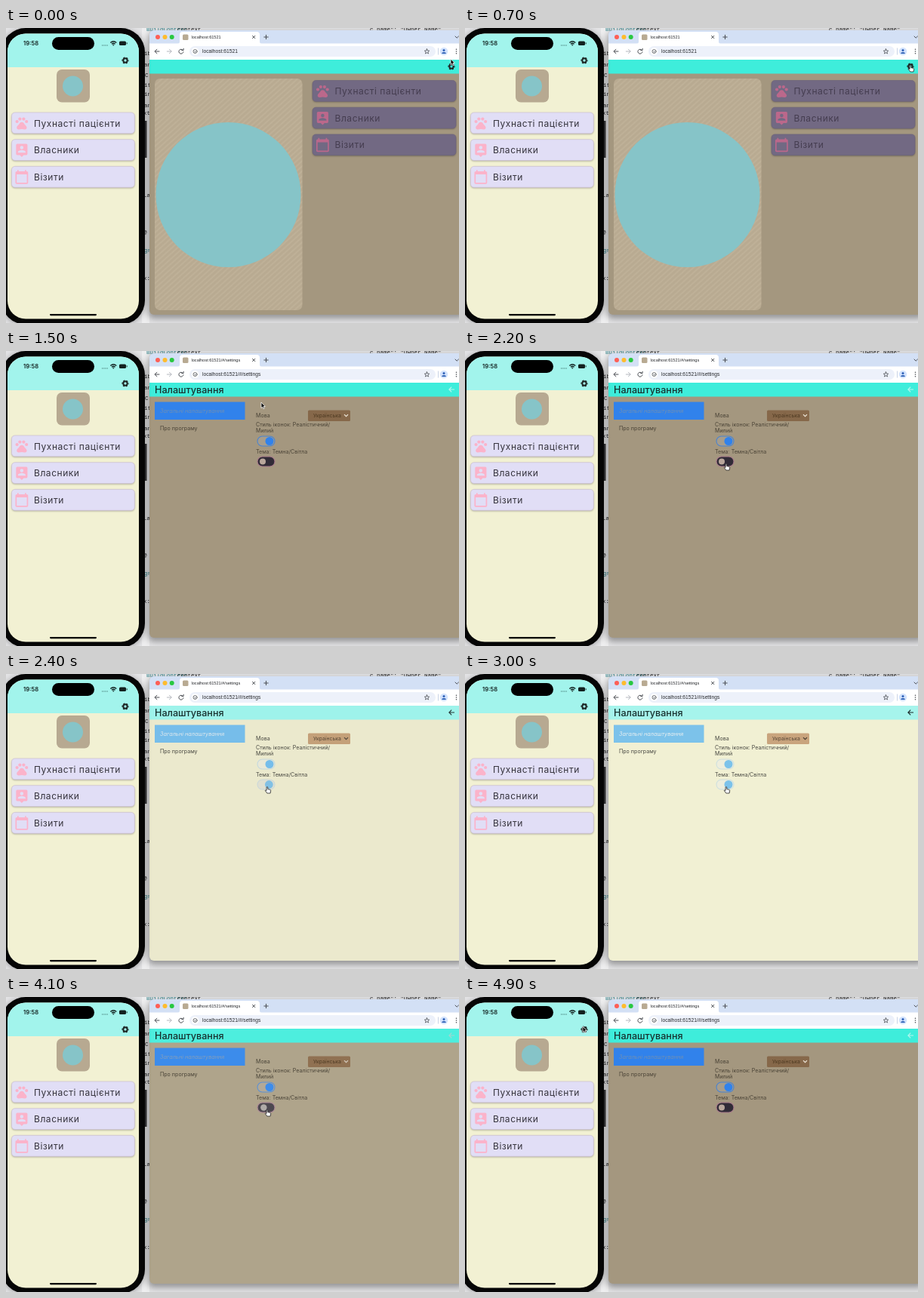
Write an HTML page that moves like this. It is 600 px wide and 391 px high and loops after 5 s.

```html
<!DOCTYPE html>
<html lang="uk">
<head>
<meta charset="utf-8">
<style>
html, body { margin: 0; width: 100%; height: 100%; overflow: hidden; background: #e3e3e5; }
svg { display: block; width: 600px; height: 391px; --k: 0%; }
text { font-family: Inter, "Noto Sans", sans-serif; white-space: pre; }
.code { font: 7.5px "Liberation Mono", monospace; fill: #222; }
.ui { font-family: "Liberation Sans", Arial, sans-serif; fill: #26282c; }
.line { fill: none; stroke: #4a4d52; stroke-width: 1; stroke-linecap: round; stroke-linejoin: round; }
.row { font-size: 12px; letter-spacing: .55px; }
.small { font-size: 7.1px; fill: color-mix(in srgb, #484842 var(--k), #4a4336); }
/* --k runs from the dark theme (0%) to the light one (100%) */
.bg { fill: color-mix(in srgb, #f1f0d3 var(--k), #a4977f); }
.bar { fill: color-mix(in srgb, #a6f4ec var(--k), #3eeddb); }
.accent { fill: color-mix(in srgb, #7cc2ea var(--k), #3182eb); }
.accentText { font-size: 7.3px; font-style: italic; fill: color-mix(in srgb, #e6eef0 var(--k), #6f8fb4); }
.menu { fill: color-mix(in srgb, #c9a47d var(--k), #86684a); }
.menuText { font-size: 6.8px; fill: color-mix(in srgb, #544536 var(--k), #4c3820); }
.chevron { fill: none; stroke-width: 1.2; stroke: color-mix(in srgb, #453a30 var(--k), #f0e8dc); }
.back { fill: none; stroke-width: 1.2; stroke: color-mix(in srgb, #1d2b2a var(--k), #b4f6ee); }
.track { stroke-width: 1.1; }
.on { fill: color-mix(in srgb, #eeeedd var(--k), #a79d8c); stroke: color-mix(in srgb, #cfe0df var(--k), #4a83d0); }
.theme { fill: color-mix(in srgb, #eeeedd var(--k), #312b37); stroke: color-mix(in srgb, #cfe0df var(--k), #a87a8a); }
.themeThumb { fill: color-mix(in srgb, #7cc2ea var(--k), #b9a79c); }
</style>
</head>
<body>
<svg id="stage" viewBox="0 0 600 391">
  <defs>
    <filter id="soft" x="-20%" y="-20%" width="140%" height="140%"><feGaussianBlur stdDeviation=".8"/></filter>
    <filter id="wide" x="-10%" y="-10%" width="120%" height="120%"><feGaussianBlur stdDeviation="4"/></filter>
    <pattern id="hatch" width="5" height="5" patternUnits="userSpaceOnUse" patternTransform="rotate(48)">
      <path d="M1 0V5" stroke="#95866d" stroke-width="1" opacity=".16"/>
      <path d="M3.500 0V5" stroke="#d8cbb2" stroke-width="1" opacity=".16"/>
    </pattern>
    <g id="paw">
      <circle cx="4.5" cy="9.5" r="2.5"/><circle cx="9" cy="5.5" r="2.5"/>
      <circle cx="15" cy="5.5" r="2.5"/><circle cx="19.5" cy="9.5" r="2.5"/>
      <path d="M12 10.5c-3 0-3.600 2.400-5.300 4.400c-1.300 1.300-2.900 2.800-2.600 4.800c.6 2 1.800 2.500 3.400 2.300q4.500-.9 9 0c1.600.2 2.800-.3 3.400-2.300c.3-2-1.300-3.500-2.600-4.800c-1.700-2-2.300-4.400-5.300-4.400z"/>
    </g>
    <path id="owner" fill-rule="evenodd" d="M19 2H5a2 2 0 0 0-2 2v14a2 2 0 0 0 2 2h4l3 3 3-3h4a2 2 0 0 0 2-2V4a2 2 0 0 0-2-2zM12 5.300a2.700 2.700 0 1 1 0 5.400a2.700 2.700 0 0 1 0-5.400zM18 16H6v-.9c0-2 4-3.100 6-3.100s6 1.100 6 3.100z"/>
    <path id="visit" fill-rule="evenodd" d="M20 3h-1V1h-2v2H7V1H5v2H4a2 2 0 0 0-2 2v16a2 2 0 0 0 2 2h16a2 2 0 0 0 2-2V5a2 2 0 0 0-2-2zM20 21H4V8h16z"/>
    <g id="gear" fill="none" stroke="#1c2423">
      <circle r="2.700" stroke-width="2"/>
      <circle r="4" stroke-width="1.200" stroke-dasharray="2.200 1.989" stroke-dashoffset="1.100"/>
    </g>
    <clipPath id="page"><path d="M190 42H600V380H196a6 6 0 0 1-6-6z"/></clipPath>
    <clipPath id="screen"><rect x="2" y="7.500" width="174" height="378" rx="24"/></clipPath>
  </defs>

  <rect width="600" height="391" fill="#e3e3e5"/>
  <g id="editor"></g>

  <rect x="188" y="6" width="420" height="379" rx="7" opacity=".35" filter="url(#wide)"/>
  <path d="M190 380V9a6 6 0 0 1 6-6H600V42H190z" fill="#d3e0f5"/>
  <g fill="#fe5f57"><circle cx="201" cy="12" r="3"/><circle cx="210.500" cy="12" r="3" fill="#febc2e"/><circle cx="219.700" cy="12" r="3" fill="#28c840"/></g>
  <path d="M227 21q3 0 3-3V9q0-4 4-4h98q4 0 4 4v9q0 3 3 3z" fill="#fff"/>
  <rect x="190" y="20.500" width="410" height="21.500" fill="#fff"/>
  <rect x="234" y="8.500" width="7.500" height="7.500" rx="1.500" fill="#b8aa92"/>
  <text id="tabUrl" class="ui" x="245.500" y="14.200" font-size="5.600"></text>
  <path class="line" d="M326.500 10.300l3.400 3.400m0-3.400l-3.400 3.400M341.800 12h5.400m-2.700-2.700v5.400M595 11l2.200 2.200 2.200-2.200"/>
  <path class="line" d="M203 31h-5.800m2.700-2.800l-2.800 2.800 2.800 2.800M234.300 29.300a3 3 0 1 0 .6 2.400m.2-4.500v2.300h-2.300"/>
  <path class="line" style="stroke:#b4b8be" d="M213.300 31h5.800m-2.700-2.800l2.800 2.800-2.800 2.800"/>
  <rect x="243" y="24" width="326" height="14" rx="7" fill="#edf1fa"/>
  <circle cx="250.500" cy="31" r="4.800" fill="#fff"/>
  <g class="line" style="stroke-width:.8"><circle cx="250.500" cy="31" r="2.500"/><path d="M250.500 30.800v1.300"/></g>
  <text id="url" class="ui" x="260" y="33.300" font-size="6.700"></text>
  <path class="line" style="stroke-width:.8" d="M557.500 27.800l.9 2.200 2.300.2-1.800 1.500.6 2.300-2-1.300-2 1.300.6-2.300-1.800-1.500 2.300-.2z"/>
  <path d="M572.500 26.500v9" stroke="#c9d3e6"/>
  <circle cx="580" cy="31" r="5.200" fill="#d3e3fd"/>
  <g fill="#2c5fb5"><circle cx="580" cy="29.600" r="1.500"/><path d="M577.200 33.900q0-2 2.800-2t2.800 2z"/></g>
  <g fill="#44474c"><circle cx="596.500" cy="28.300" r=".8"/><circle cx="596.500" cy="31" r=".8"/><circle cx="596.500" cy="33.700" r=".8"/></g>

  <g clip-path="url(#page)">
    <g id="home">
      <rect class="bg" x="190" y="42" width="410" height="340"/>
      <rect class="bar" x="190" y="42" width="410" height="18.500"/>
      <use href="#gear" x="590" y="51"/>
      <rect x="197" y="67" width="195.500" height="307" rx="7" fill="#bbad94"/>
      <rect x="197" y="67" width="195.500" height="307" rx="7" fill="url(#hatch)"/>
      <circle cx="294.500" cy="221" r="96" fill="#86c4c8"/>
      <g id="webRows" transform="translate(398.500 -42.500)"></g>
    </g>
    <g id="settings">
      <rect class="bg" x="190" y="42" width="410" height="340"/>
      <rect class="bar" x="190" y="42" width="410" height="18.500"/>
      <text x="197" y="55.500" font-size="12.600" font-weight="500" fill="#17302e">Налаштування</text>
      <path class="back" d="M594 51h-7m3.200-3.300l-3.300 3.300 3.300 3.300"/>
      <rect class="accent" x="197" y="67.500" width="119.500" height="23.500"/>
      <text class="accentText" x="204" y="81.500">Загальні налаштування</text>
      <text class="small" x="204" y="105">Про програму</text>
      <text class="small" x="331" y="88">Мова</text>
      <rect class="menu" x="400" y="78.500" width="56" height="14.500" rx="1.500"/>
      <text class="menuText" x="407" y="88">Українська</text>
      <path class="chevron" d="M448 84.200l2.500 2.500 2.500-2.500"/>
      <text class="small" x="331" y="99.500">Стиль іконок: Реалістичний/</text>
      <text class="small" x="331" y="108.300">Милий</text>
      <rect class="track on" x="333" y="113" width="23" height="13" rx="6.500"/>
      <circle class="accent" cx="349" cy="119.500" r="5.500"/>
      <text class="small" x="331" y="135.500">Тема: Темна/Світла</text>
      <rect class="track theme" x="333" y="140" width="23" height="13" rx="6.500"/>
      <circle id="thumb" class="themeThumb" cy="146.500"/>
    </g>
  </g>

  <rect x="-6" y="2" width="190" height="391" rx="32" opacity=".4" filter="url(#wide)"/>
  <rect x="-6" y="0" width="190" height="393" rx="32" fill="#050505"/>
  <g clip-path="url(#screen)">
    <rect width="180" height="391" fill="#f2f1d3"/>
    <rect width="180" height="52" fill="#a2f4ec"/>
  </g>
  <rect x="61" y="12" width="56" height="17" rx="8.500"/>
  <text x="23" y="23.300" font-size="7.600" font-weight="600" fill="#12211f">19:58</text>
  <path d="M127 23h8" stroke="#3d6f6a" stroke-width="1" stroke-dasharray="1.200 1"/>
  <g fill="none" stroke="#12211f" stroke-width="1.300">
    <path d="M138.300 19.500q4-3.600 8 0M140 21.300q2.300-2 4.600 0"/>
    <circle cx="142.300" cy="22.500" r=".3"/>
  </g>
  <rect x="150" y="17.500" width="9" height="5.500" rx="1.600" fill="#12211f"/>
  <path d="M160.200 19.300v2" stroke="#12211f" stroke-width=".9"/>
  <use href="#gear" x="158" y="43"/>
  <rect x="67" y="55" width="44" height="43.500" rx="7" fill="#b7a991"/>
  <circle cx="88.500" cy="77" r="13.500" fill="#86c4c8"/>
  <g id="phoneRows"></g>
  <rect x="58" y="379" width="62" height="2.200" rx="1.100"/>

  <g id="cursor" stroke-width=".8" stroke-linejoin="round">
    <path id="arrow" stroke="#fff" d="M0 0v7.600l1.700-1.500 1.200 2.600 1.300-.6-1.200-2.500h2.300z"/>
    <path id="hand" fill="#fff" stroke="#222" d="M-.9 0q.9-1 1.700 0v2.700l3 .6q1 .3.900 1.400l-.6 3.300h-4.300l-2.400-3.300q-.2-1 .8-.8l.9.700z"/>
  </g>
</svg>
<script>
const $ = id => document.getElementById(id);
const LOOP = 5000, STEP = 100;

// three menu rows, shared by the phone and the page
const rows = (width, face, edge, icon, ink) =>
  [['paw', 'Пухнасті пацієнти'], ['owner', 'Власники'], ['visit', 'Візити']].map(([id, label], i) => {
    const y = 112 + i * 35.7, box = `x="7.5" width="${width}" height="27.8" rx="4.5"`;
    return `<rect ${box} y="${y + 1}" opacity=".3" filter="url(#soft)"/>
      <rect ${box} y="${y}" fill="${face}" stroke="${edge}" stroke-width=".7"/>
      <use href="#${id}" fill="${icon}" transform="translate(10.8 ${y + 4}) scale(.84)"/>
      <text class="row" x="37" y="${y + 18.5}" fill="${ink}">${label}</text>`;
  }).join('');
$('phoneRows').innerHTML = rows(162.800, '#e1def6', '#cdc0d4', '#fbb3ca', '#35333c');
$('webRows').innerHTML = rows(190, '#726983', '#6c637c', '#bb688b', '#453d50');

// slivers of the editor behind the windows
const code = [['BuildContext', 186, 4, '#2b7f86'], ['context', 227, 4], ['c_name": "Owner_Name"', 482, 4],
  ['ib', 183, 36], ['an', 183, 51], ['C', 184, 65], ['ite', 183, 78], ['in', 183, 90], ['an', 183, 105],
  ['xt', 182, 115], ['La', 182, 224], ['@', 182, 273], ['gr', 183, 297, '#2b7f86'], ['x:', 182, 334]];
$('editor').innerHTML = '<rect x="180" width="10" height="391" fill="#eeeeef"/>' +
  code.map(([s, x, y, c = '#222']) => `<text class="code" x="${x}" y="${y}" style="fill:${c}">${s}</text>`).join('') +
  '<rect x="184" y="123" width="2.500" height="49" fill="#3a3a3c"/>';

const path = [[0, 589, 41], [500, 590, 50], [900, 590, 50], [1450, 338, 68], [1600, 338, 68],
  [2100, 346, 150], [4300, 346, 150], [4850, 156, 39], [LOOP, 156, 39]];
const ramp = (t, a, b) => Math.min(1, Math.max(0, (t - a) / (b - a)));
const ease = u => u * u * (3 - 2 * u);

function pointer(t) {
  const i = path.findIndex(p => p[0] > t), [a, x, y] = path[i - 1], [b, X, Y] = path[i];
  const u = ease(ramp(t, a, b));
  return [x + (X - x) * u, y + (Y - y) * u];
}

function draw(t) {
  const light = ease(ramp(t, 2200, 2440)) - ease(ramp(t, 3960, 4145));
  const shown = ramp(t, 900, 1100);
  $('stage').style.setProperty('--k', light * 100 + '%');
  $('settings').setAttribute('opacity', shown);
  $('home').style.display = shown < 1 ? '' : 'none';
  $('thumb').setAttribute('cx', 340 + 9 * light);
  $('thumb').setAttribute('r', 4 + 1.5 * light);
  $('url').textContent = $('tabUrl').textContent = 'localhost:61521' + (shown ? '/#/settings' : '');
  const hand = t >= 500 && t < 1000 || t >= 2000 && t < 4400;
  $('hand').style.display = hand ? '' : 'none';
  $('arrow').style.display = hand ? 'none' : '';
  $('cursor').setAttribute('transform', `translate(${pointer(t)})`);
}

const start = performance.now();
function tick() {
  draw(Math.floor((performance.now() - start) % LOOP / STEP) * STEP);
  requestAnimationFrame(tick);
}
tick();
</script>
</body>
</html>
```
